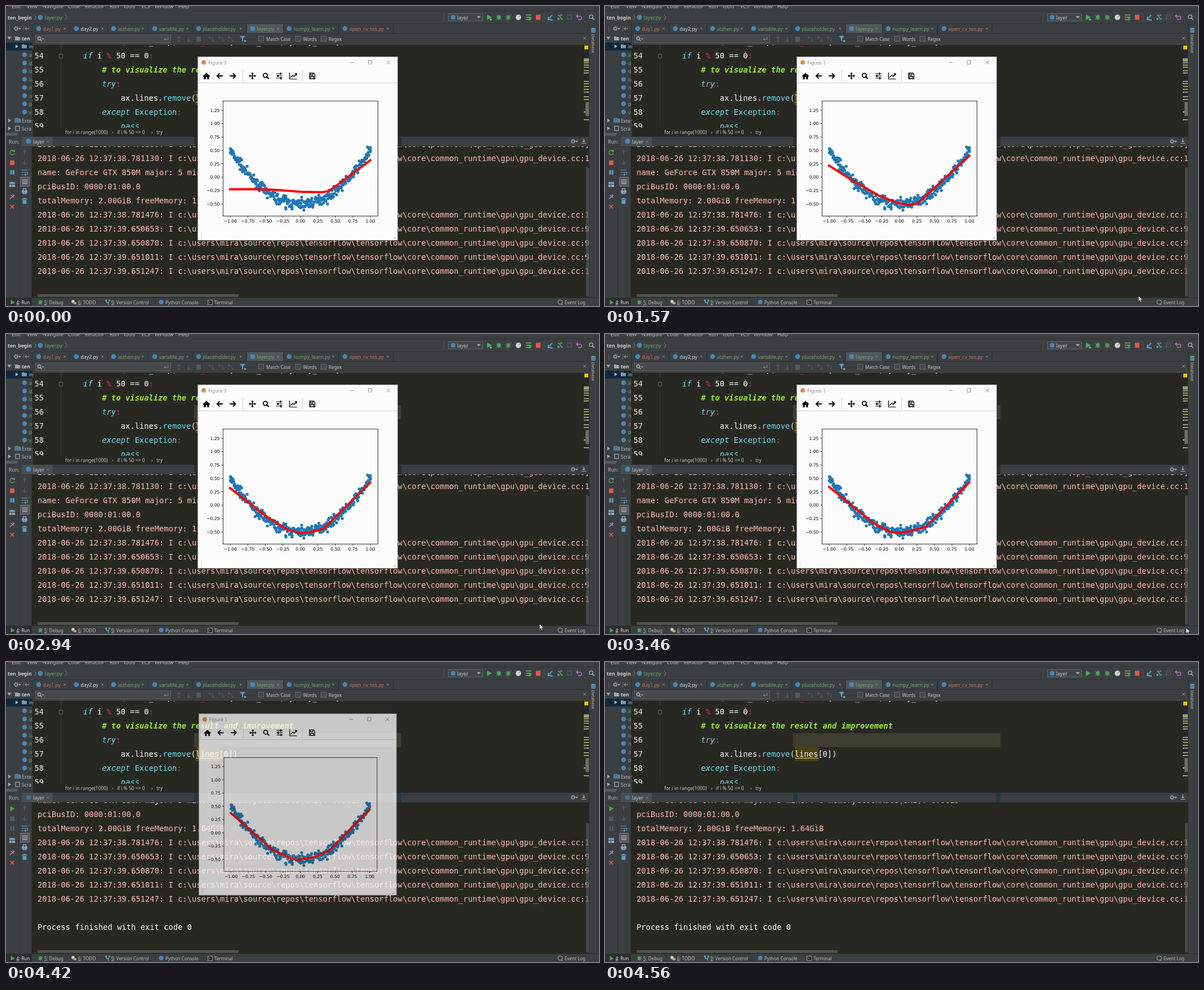
An HTML page that plays this animation: 1053x532 px, repeating every 4940 ms.

```html
<!DOCTYPE html>
<html lang="en">
<head>
<meta charset="utf-8">
<title>Curve fitting</title>
<style>
html, body { margin: 0; width: 100%; height: 100%; overflow: hidden; background: #272822; }
svg { display: block; }
text { white-space: pre; font-family: "Noto Sans", sans-serif; }
.mono { font: 13.81px "DejaVu Sans Mono", monospace; }
.axis { font: 7.7px "DejaVu Sans", sans-serif; }
</style>
</head>
<body>
<svg id="stage" width="1053" height="532" viewBox="0 0 1053 532"></svg>
<script>
const stage = document.getElementById('stage');
const UI = '#3c3f41', DARK = '#272822', TEXT = '#bbbbbb', DIM = '#575b5d', PY = '#4b86b4',
  GREEN = '#4fa55a', RED = '#e0584f', BLUE = '#5d9fc4', CYAN = '#66d9ef', PINK = '#f92672', WHITE = '#f8f8f2';

function add(parent, tag, attrs, content) {
  const e = document.createElementNS('http://www.w3.org/2000/svg', tag);
  for (const k in attrs) e.setAttribute(k, attrs[k]);
  if (content !== undefined) e.textContent = content;
  return parent.appendChild(e);
}
const group = (p, attrs = {}) => add(p, 'g', attrs);
const rect = (p, x, y, width, height, fill, more) => add(p, 'rect', {x, y, width, height, fill, ...more});
const dot = (p, cx, cy, r, fill) => add(p, 'circle', {cx, cy, r, fill});
const shape = (p, d, fill) => add(p, 'path', {d, fill});
const line = (p, d, stroke, w = 1) => add(p, 'path', {d, stroke, 'stroke-width': w, fill: 'none'});
const label = (p, x, y, s, fill = TEXT, size = 8.7, more) =>
  add(p, 'text', {x, y, fill, 'font-size': size, ...more}, s);
const mono = (p, x, y, s, fill) => add(p, 'text', {x, y, fill, class: 'mono'}, s);
const cross = (p, x, y, r, c, w) => line(p, `M${x - r} ${y - r}l${2 * r} ${2 * r}m0 ${-2 * r}l${-2 * r} ${2 * r}`, c, w);
const play = (p, x, y, r, c) => shape(p, `M${x - r + 1} ${y - r}l${2 * r - 1} ${r}l${1 - 2 * r} ${r}z`, c);
const lens = (p, x, y, r, c, w) => {
  add(p, 'circle', {cx: x, cy: y, r, fill: 'none', stroke: c, 'stroke-width': w});
  line(p, `M${x + r * .7} ${y + r * .7}l${r} ${r}`, c, w * 1.2);
};
const clip = (id, x, y, w, h) => {
  rect(add(stage, 'clipPath', {id}), x, y, w, h);
  return group(stage, {'clip-path': `url(#${id})`});
};

// ---------- editor ----------
const editor = clip('editor', 46, 69, 990, 147);
rect(editor, 46, 69, 990, 147, DARK);
line(editor, 'M97.5 69v146', '#3b3c36');
rect(editor, 94.5, 85.5, 6, 7, DARK, {stroke: '#5a5b55'});
const caretRow = rect(editor, 334, 126, 368, 25, '#3e3d32');
rect(editor, 337, 151, 42, 25, '#4c410f');
line(editor, 'M337 170.5h42', '#d8c8a0');

function code(n, col, tokens) {
  const y = 93 + (n - 54) * 25;
  mono(editor, 50.5, y, n, '#e8e8e2');
  const t = mono(editor, 104 + col * 8.314, y, '', WHITE);
  for (const [s, fill = WHITE, style = 'normal', weight = 'normal'] of tokens)
    add(t, 'tspan', {fill, 'font-style': style, 'font-weight': weight}, s);
}
const key = s => [s, CYAN, 'italic'];
code(53, 4, [['sess.run(train_step, '], ['feed_dict', PINK], ['={xs: x_data, ys: y_data})']]);
code(54, 4, [key('if'), [' i '], ['%', PINK], [' 50 == 0'], [':', PINK]]);
code(55, 8, [['# to visualize the result and improvement', '#98e83c', 'italic', 'bold']]);
code(56, 8, [key('try'), [':', PINK]]);
code(57, 12, [['ax.lines.'], ['remove', CYAN], ['(lines[0])']]);
code(58, 8, [key('except'), [' Exception', CYAN], [':', PINK]]);
code(59, 12, [key('pass')]);

rect(editor, 1027, 70, 7, 7, '#e8c000');
rect(editor, 1029, 170, 6, 25, '#6b6c66');
for (const y of [93, 95, 97, 100, 104, 108, 114, 118, 133, 137, 142, 147, 152, 160, 165, 201])
  rect(editor, 1026, y, 9, 1.4, '#d0cba0');
rect(editor, 1026, 187, 3, 2, '#d9a520');

rect(stage, 46, 216, 990, 16, DARK);
[[105, 'for i in range(1000)'], [188, '›'], [197, 'if i % 50 == 0'], [258, '›'], [267, 'try']]
  .forEach(([x, s]) => label(stage, x, 226.5, s, '#c4c4c0', 8.5));

// ---------- console ----------
const panel = clip('console', 46, 249, 989, 268);
rect(panel, 46, 249, 989, 268, DARK);
const output = group(panel);
const root = String.raw`c:\users\mira\source\repos\tensorflow\tensorflow\core`;
const log = (sec, file) => `2018-06-26 12:37:${sec}: I ${root}\\${file}`;
const gpu = (sec, n) => log(sec, String.raw`common_runtime\gpu\gpu_device.cc:` + n + ']');
[
  log('38.470380', String.raw`platform\cpu_feature_guard.cc:140]`),
  gpu('38.781130', 1356),
  'name: GeForce GTX 850M major: 5 minor: 0 memoryClockRate(GHz): 0.9015',
  'pciBusID: 0000:01:00.0',
  'totalMemory: 2.00GiB freeMemory: 1.64GiB',
  gpu('38.781476', 1435), gpu('39.650653', 923), gpu('39.650870', 929),
  gpu('39.651011', 942), gpu('39.651247', 1053)
].forEach((s, i) => mono(output, 56, 250 + i * 25, s, '#ffb9b0'));
const exitText = mono(output, 56, 525, 'Process finished with exit code 0', WHITE);
rect(panel, 56, 511, 357, 5, '#52534e');
rect(panel, 1030, 286, 5, 229, '#5a5b55', {opacity: .65});

// ---------- top bars ----------
rect(stage, 0, 0, 1053, 69, UI);
[[10, 'Edit'], [37, 'View'], [65, 'Navigate'], [110, 'Code'], [140, 'Refactor'], [184, 'Run'], [208, 'Tools'],
  [240, 'VCS'], [264, 'Window'], [306, 'Help']].forEach(([x, s]) => label(stage, x, 4, s, TEXT, 8.8));
line(stage, 'M0 8.5h1053M0 31.5h1053', '#323537');
label(stage, 3, 23.5, 'ten_begin', '#d0d0d0', 8.7, {'font-weight': 600});
line(stage, 'M50 15l3 5l-3 5M105 15l3 5l-3 5', '#777b7d');
dot(stage, 61, 20, 4.5, PY);
label(stage, 69, 23.5, 'layer.py', '#72a86e');

rect(stage, 785.5, 13.5, 61, 13, '#414547', {stroke: '#626668'});
dot(stage, 794, 20, 4, PY);
label(stage, 801, 23.5, 'layer', '#d0d0d0');
shape(stage, 'M836 18h7l-3.5 4z', '#b0b0b0');
play(stage, 858, 20, 5, GREEN);
for (const x of [875, 892]) {
  add(stage, 'ellipse', {cx: x, cy: 20, rx: 3.2, ry: 4.3, fill: x < 880 ? GREEN : '#6f8272'});
  line(stage, `M${x - 5} 16l10 8m0-8l-10 8M${x - 5} 20h10`, GREEN, .8);
}
dot(stage, 910, 20, 4.8, '#d8d8d8');
line(stage, 'M910 20l3-3', '#333');
line(stage, 'M923 16h10M923 20h10M923 24h6', GREEN, 2);
play(stage, 931, 23, 3, GREEN);
rect(stage, 941, 15.5, 8, 9, RED);
line(stage, 'M955.5 13v14M777.5 13v14', '#515557');
line(stage, 'M962 24l8-8M963 19v5h5M967 25h4', BLUE, 1.8);
line(stage, 'M980 17h3l3 6h3M984 16h4', GREEN, 1.8);
dot(stage, 981, 23, 2, BLUE);
rect(stage, 997, 16, 7, 7, 'none', {stroke: DIM, 'stroke-width': 1.5});
line(stage, 'M1015 15l-2 3l3 3M1013 18h6c5 0 4 6 0 6h-3', '#b07ac0', 1.6);
lens(stage, 1039, 19, 3.2, '#b8b8b8', 1.3);

// tabs: icon x, close x, name, colour
const tabs = [[58, 104, 'day1.py', '#d1705f'], [125, 171, 'day2.py', '#d8d8d8'], [191, 243, 'atzhen.py'],
  [264, 322, 'variable.py'], [342, 417, 'placeholder.py'], [438, 483, 'layer.py'],
  [503, 581, 'numpy_learn.py'], [602, 678, 'open_cv_tes.py', '#d1705f']];
for (const [x, end, name, fill = '#72a86e'] of tabs) {
  if (name == 'layer.py') rect(stage, x - 10, 32, end - x + 20, 16, '#52575a');
  dot(stage, x, 40, 4.3, PY);
  label(stage, x + 7.5, 43.5, name, fill);
  cross(stage, end, 40, 2, '#868a8c', .9);
  line(stage, `M${end + 9.5} 32v16`, '#2b2d2f');
}
line(stage, 'M46 48.5h990', '#2d3032');

// search bar
rect(stage, 52.5, 51.5, 240, 14, '#45494a', {stroke: '#5a5e60'});
lens(stage, 59, 57.5, 2.6, TEXT, 1.1);
shape(stage, 'M64 57.5h4l-2 2.5z', TEXT);
line(stage, 'M288 55v4h-7m2-2l-2 2l2 2', '#8a8d8f');
line(stage, 'M307 63v-9l-3 3m3-3l3 3M324 54v9l-3-3m3 3l3-3', DIM, 1.3);
rect(stage, 338, 54, 8, 9, DIM);
for (const x of [364, 381, 398]) line(stage, `M${x - 5} 56h6m-3-3v6M${x + 1} 62h5M${x + 3} 55v7`, DIM);
shape(stage, 'M415 53h10l-4 4.5v5l-2-1v-4z', BLUE);
shape(stage, 'M422 61h5l-2.5 3z', TEXT);
[[448, 'Match Case'], [513.5, 'Words'], [559, 'Regex']].forEach(([x, s]) => {
  rect(stage, x + .5, 53.5, 9, 9, '#43484a', {stroke: '#6b6f71'});
  label(stage, x + 14, 61.5, s, '#c8c8c8', 8);
});
cross(stage, 1027.5, 57, 2.5, '#a0a0a0');

// ---------- project tree ----------
rect(stage, 0, 31, 46, 201, UI);
const gear = (x, y) => add(stage, 'circle', {cx: x, cy: y, r: 2.7, fill: 'none', stroke: '#a8abad', 'stroke-width': 2, 'stroke-dasharray': '1.7 .4'});
gear(18, 40);
shape(stage, 'M22 39h5l-2.5 3z', '#a8abad');
line(stage, 'M6.5 35v10M31.5 35v10', '#606466');
line(stage, 'M41 40h-7l3-3m-3 3l3 3', '#a8abad');
rect(stage, 0, 65, 46, 14, '#0d293e');
shape(stage, 'M2.5 54.5h7l-3.5 5z', '#a8abad');
shape(stage, 'M16 54h4l1 1h4v6h-9z', '#9aa7b0');
label(stage, 28, 60.5, 'ten', '#d0d0d0', 8.7, {'font-weight': 600});
const arrow = (x, y) => shape(stage, `M${x} ${y - 3.5}l5 3.5l-5 3.5z`, '#a8abad');
arrow(17, 71.5);
shape(stage, 'M28 68h4l1 1h4v6h-9z', '#7f98ab');
label(stage, 41, 75, 'in', '#d0d0d0');
['a', 'd', 'd', 'la', 'n', 'o', 'p', 'v'].forEach((s, i) => {
  dot(stage, 33, 86.5 + i * 14.5, 4.2, PY);
  label(stage, 41, 90 + i * 14.5, s, s == 'o' ? '#d1705f' : '#72a86e');
});
arrow(4, 203);
arrow(4, 217);
line(stage, 'M16.5 199v8M19.5 198v9M22.5 199v8M25 200v7', BLUE, 1.8);
rect(stage, 17, 213, 7, 8, 'none', {stroke: '#9aa7b0', 'stroke-width': 1.3});
label(stage, 28, 206.5, 'Exter');
label(stage, 28, 220.5, 'Scrat');
rect(stage, 0, 225, 20, 5, '#585c5e');
rect(stage, 46, 31, 1, 201, '#2d3032');
rect(stage, 46, 203, 2, 29, UI);

// ---------- run panel frame ----------
rect(stage, 0, 232, 1053, 17, UI);
rect(stage, 28, 232, 55, 17, '#4a4e51');
label(stage, 5, 243.5, 'Run:');
const runDot = dot(stage, 40, 240, 4.5, PY);
label(stage, 48, 243.5, 'layer', '#c8c8c8');
cross(stage, 74.5, 240.5, 2, '#868a8c', .9);
gear(1007, 240);
shape(stage, 'M1011 239h5l-2.5 3z', '#a8abad');
line(stage, 'M1026 235v6l-2-2m2 2l2-2M1022 243.5h8', '#a8abad', 1.2);
const edges = group(stage);
rect(edges, 334, 232, 8, 17);
rect(edges, 694, 232, 8, 17);
rect(stage, 0, 249, 46, 269, UI);
line(stage, 'M0 249.5h46M22.5 250v268M45.5 249v269', '#313436');

const running = group(stage), stopped = group(stage);
line(running, 'M14 257a4 4 0 1 0 1 4M15 255v3h-4', GREEN, 1.5);
rect(running, 7, 274, 8, 8, RED);
rect(running, 7.5, 291, 3, 8, BLUE);
rect(running, 12, 291, 3, 8, BLUE);
play(stopped, 11, 260, 4.5, GREEN);
rect(stopped, 7, 274, 8, 8, DIM);
rect(stopped, 7.5, 291, 3, 8, DIM);
rect(stopped, 12, 291, 3, 8, DIM);
dot(running, 861, 24, 1.8, '#6fd47c');
rect(stage, 6, 312, 10, 4, BLUE);
rect(stage, 6, 317, 4, 4, '#9aa7b0');
rect(stage, 11, 317, 5, 4, '#9aa7b0');
line(stage, 'M7 342l3-3m-1-4l5 5m-2-6l3 3m-1-1l-4 4', '#b07ac0', 1.7);
cross(stage, 11, 356, 3.2, RED, 1.7);
line(stage, 'M33 264v-8l-3 3m3-3l3 3M33 273v8l-3-3m3 3l3-3', DIM, 1.4);
line(stage, 'M28 291h10M28 295h9c3 0 2 4-1 4h-3m2-2l-2 2l2 2M28 299h3', BLUE, 1.2);
rect(stage, 25.5, 303.5, 16, 16, '#55595c', {stroke: '#73777a'});
rect(stage, 29, 307, 9, 9, '#9c8aa5');
line(stage, 'M30 309h7M30 312h7', UI);
rect(stage, 28, 327, 10, 4.5, BLUE);
rect(stage, 30.5, 324, 5, 9, 'none', {stroke: '#a9bcc8', 'stroke-width': 1.2});
rect(stage, 29.5, 344, 7, 7, BLUE);
line(stage, 'M28 342.5h10M31 341h4', BLUE, 1.4);

// ---------- right and bottom strips ----------
rect(stage, 1035, 31, 18, 487, UI);
line(stage, 'M1035.5 31v487M1051.5 31v487', '#2f3234');
rect(stage, 1039, 39, 8, 8, BLUE, {rx: 2});
line(stage, 'M1039 42h8M1039 44.5h8', UI, .7);
label(stage, 0, 0, 'Database', TEXT, 7.6, {transform: 'translate(1039.5 50) rotate(90)'});

rect(stage, 0, 517, 1053, 15, UI);
rect(stage, 0, 518, 46, 14, '#2c2e2f');
line(stage, 'M0 517.5h1053', '#2f3234');
play(stage, 11.5, 525.5, 4, GREEN);
add(stage, 'ellipse', {cx: 61, cy: 525.5, rx: 2.8, ry: 3.6, fill: GREEN});
line(stage, 'M57 522l8 7m0-7l-8 7', GREEN, .8);
dot(stage, 119, 524, 2.8, '#d6d6d6');
rect(stage, 120, 525, 5, 4, '#d0a060');
line(stage, 'M178 522v3l4 2v3M184 522l-2 4', BLUE, 1.6);
dot(stage, 177.5, 522, 1.7, BLUE);
dot(stage, 184, 522, 1.7, GREEN);
dot(stage, 275.5, 525, 4, PY);
rect(stage, 358.5, 521.5, 8, 8, '#222', {stroke: '#999'});
line(stage, 'M360 523.5l2 2l-2 2', '#ddd', .9);
add(stage, 'circle', {cx: 984, cy: 525, r: 4, fill: 'none', stroke: '#a8abad'});
line(stage, 'M985 529h4', '#a8abad');
[[18.5, '4', ': Run', '#e0e0e0'], [68, '5', ': Debug'], [128, '6', ': TODO'], [187, '9', ': Version Control'],
  [283, '', 'Python Console'], [370, '', 'Terminal'], [992, '', 'Event Log']].forEach(([x, n, s, fill]) => {
  const t = label(stage, x, 528.5, '', fill, 8);
  add(t, 'tspan', {'text-decoration': 'underline'}, n);
  add(t, 'tspan', {}, s);
});

// ---------- figure window ----------
const fig = group(stage);
rect(fig, 340.5, 90, 355, 325.5, '#fcfcfc', {stroke: '#8a8a8a', 'stroke-width': .6});
dot(fig, 351, 100, 4, '#e08a4a');
label(fig, 359, 103.5, 'Figure 1', '#8c8c8c', 8.6);
line(fig, 'M610.5 100h7M643.5 96.5h6v6.5h-6z', '#777', .8);
cross(fig, 679, 100, 3.2, '#777', .8);
line(fig, 'M341 136.5h354', '#c4c4c4', .8);
line(fig, 'M343.5 114v20M420.5 114v20M526.5 114v20M347 403v10', '#d0d0d0', .8);
shape(fig, 'M349.5 124.5l6.5-6l6.5 6l-1 1l-1-1v5.500h-3.200v-4h-2.600v4h-3.200v-5.500l-1 1z', '#000');
for (const [x, s] of [[379.5, 1], [403, -1]])
  line(fig, `M${x + 5.500 * s} 124h${-9 * s}M${x} 119.500l${-4.500 * s} 4.500l${4.500 * s} 4.500`, '#000', 2);
line(fig, 'M432.5 124h10M437.5 119v10', '#000', 1.5);
shape(fig, 'M437.5 117.500l2.500 3h-5zM437.500 130.500l2.500-3h-5zM431 124l3-2.500v5zM444 124l-3-2.500v5z', '#000');
lens(fig, 460.5, 123, 3.6, '#000', 1.8);
line(fig, 'M480 120h11M480 124h11M480 128h11', '#000', 1.2);
line(fig, 'M487.5 118v4M483 122v4M488 126v4', '#000', 2);
line(fig, 'M503.500 118v11.500h13', '#000', 1.2);
line(fig, 'M505 127l4-4l2.500 2l4.500-5m-3 0h3v3', '#000', 1.4);
line(fig, 'M539 119h7.500l2 2v8h-9.500zM541 119v3.500h4v-3.500M541 129v-4h5.500v4', '#000', 1.3);
line(fig, 'M688 413.500l5-5M690.500 413.500l2.500-2.500', '#aaa');

const px = x => 522.7 + x * 124.4, py = y => 303.6 - y * 95.1;
let seed = 7;
const rnd = () => (seed = seed * 16807 % 2147483647) / 2147483647;
const noise = () => (rnd() + rnd() + rnd() + rnd() - 2) * .075;
for (let i = 0; i < 300; i++) {
  const x = i / 149.5 - 1;
  dot(fig, px(x), py(x * x - .5 + noise()), 2.6, '#1f77b4');
}
// stray samples
[[398.5, 253], [400, 257], [401, 263], [407, 272], [413, 270], [416, 270], [418, 285], [481, 351], [497, 360],
  [508, 360], [529, 362], [525, 339], [536, 343], [497, 337], [571, 351], [642, 250], [647, 251], [647, 258]]
  .forEach(([x, y]) => dot(fig, x, y, 2.6, '#1f77b4'));
const fit = add(fig, 'polyline', {fill: 'none', stroke: '#f00', 'stroke-width': 3.9,
  'stroke-linejoin': 'round', 'stroke-linecap': 'square'});
rect(fig, 385.5, 168.5, 275, 204, 'none', {stroke: '#000', 'stroke-width': .8});
const tick = (x, y, v, anchor) =>
  add(fig, 'text', {x, y, class: 'axis', 'text-anchor': anchor}, v.toFixed(2).replace('-', '−'));
for (let v = -1; v <= 1; v += .25) {
  line(fig, `M${px(v)} 372.500v3`, '#000', .8);
  tick(px(v), 384, v, 'middle');
}
for (let v = -.5; v <= 1.25; v += .25) {
  line(fig, `M385.500 ${py(v)}h-3`, '#000', .8);
  tick(379.5, py(v) + 2.8, v, 'end');
}

const pointer = add(stage, 'path', {d: 'M0 0v9.500l2.200-2l1.500 3.300l1.400-.6l-1.500-3.200h3z', fill: '#fff', stroke: '#222', 'stroke-width': .5});

// ---------- motion ----------
const LOOP = 4940, DONE = 4110;
const updates = [230, 460, 680, 920, 1140, 1340, 1570, 1800, 2040, 2180, 2490, 2710, 2940, 3170, 3400, 3620, 3850, 4110, 4260];
// fitted curve after a number of updates: [updates, vertices]
const fits = [
  [0, [398, 325, 435, 325, 470, 325.5, 525, 329.5, 560, 330.3, 574, 328, 647, 273.5]],
  [3, [398, 302.5, 407, 303.2, 475, 324.5, 520, 339, 547, 347, 559, 346.5, 647, 270]],
  [10, [398, 277, 445, 308.5, 490, 340, 522, 353, 536, 355, 553, 352, 647, 264.4]],
  [15, [398, 271.3, 475, 334, 504, 350, 519, 353, 541, 350, 570, 342, 647, 262.8]],
  [19, [398, 268, 473, 334, 510, 351, 523, 351.5, 548, 347, 575, 335, 647, 261.8]]
];
const path = [[230, [972, 534]], [460, [964, 526]], [680, [955, 519]], [820, [951, 516]], [1140, [950, 515]],
  [1340, [947.5, 514]], [3100, [947.5, 514]], [3460, [1032, 521]], [3680, [1034, 524]], [4000, [1035, 534]]];

function between(keys, at, ease = u => u) {
  let i = 0;
  while (i < keys.length - 2 && at >= keys[i + 1][0]) i++;
  const [a, from] = keys[i], [b, to] = keys[i + 1];
  const u = ease(Math.min(1, Math.max(0, (at - a) / (b - a))));
  return from.map((v, j) => v + (to[j] - v) * u);
}
const show = (e, on) => e.setAttribute('display', on ? 'inline' : 'none');

function draw(t) {
  const n = updates.filter(u => u <= t).length;
  fit.setAttribute('points', between(fits, n, u => 1 - (1 - u) ** (n > 3 && n < 10 ? 1.7 : 1.15)).join(' '));

  const done = t >= DONE;
  output.setAttribute('transform', `translate(0 ${done ? -50 : 0})`);
  show(exitText, done);
  show(running, !done);
  show(stopped, done);
  runDot.setAttribute('opacity', done ? .55 : 1);
  show(caretRow, t >= 2490);

  const [scale, alpha] = t < 4420 ? [1, 1] : t < 4500 ? [.989, .755] : [.965, .3];
  fig.setAttribute('transform', `translate(518 252.8) scale(${scale}) translate(-518 -252.8)`);
  fig.setAttribute('opacity', alpha);
  show(fig, t < 4560);
  edges.setAttribute('fill', t < 4420 ? '#2b2e30' : '#22384a');

  pointer.setAttribute('transform', `translate(${between(path, t)})`);
}
function loop(now) {
  draw(now % LOOP);
  requestAnimationFrame(loop);
}
draw(0);
requestAnimationFrame(loop);
</script>
</body>
</html>
```
